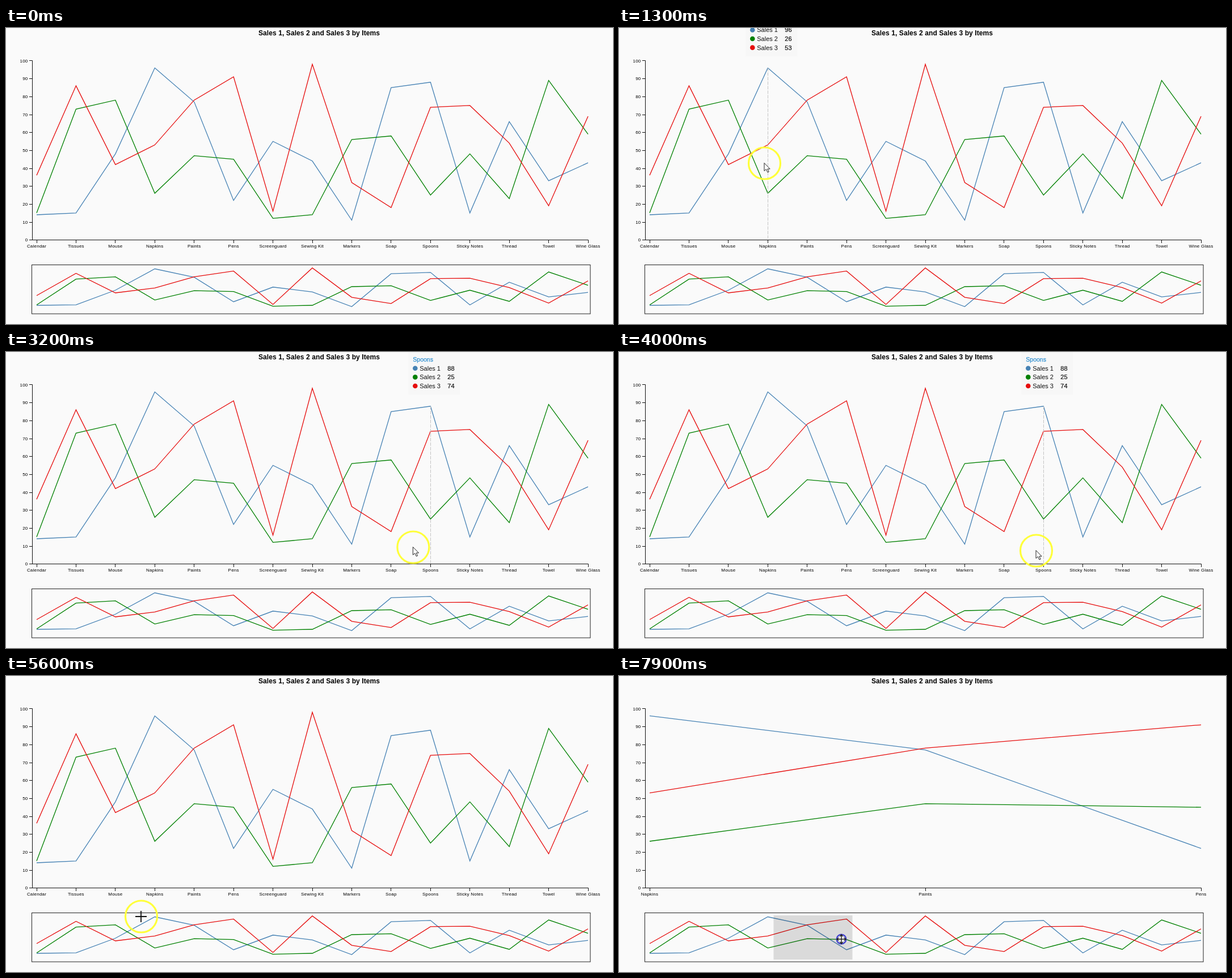
Animation, 1070 px wide and 523 px high, one loop 8000 ms. Source, as an HTML page:

```html
<!DOCTYPE html>
<html lang="en">
<head>
<meta charset="utf-8">
<title>Sales by Items</title>
<style>
  html, body { margin: 0; width: 100%; height: 100%; overflow: hidden; background: #fafafa; }
  svg { display: block; width: 1070px; height: 523px; font-family: "Liberation Sans", Arial, sans-serif; }
  .title { font-size: 12px; font-weight: bold; letter-spacing: .09px; text-anchor: middle; }
  .axis text { font-size: 8px; letter-spacing: .22px; }
  .axis path { fill: none; stroke: #111; }
  .line { fill: none; stroke-width: 1.3; }
  .tip text { font-size: 11px; fill: #111; }
  .tip .head { font-size: 10.5px; fill: #2f8fd0; stroke: #2f8fd0; stroke-width: .25; }
  .tip .num { stroke: #111; stroke-width: .2; }
</style>
</head>
<body>
<svg viewBox="0 0 1070 523">
  <text class="title" x="552" y="13.2">Sales 1, Sales 2 and Sales 3 by Items</text>
  <g id="yAxis" class="axis" text-anchor="end"></g>
  <g id="xAxis" class="axis" text-anchor="middle"></g>
  <g id="main"></g>
  <g id="mini"></g>
  <rect x="45.5" y="418.5" width="984.5" height="86.5" fill="none" stroke="#222"/>
  <rect id="brush" y="423" height="78" fill-opacity=".13"/>
  <path id="guide" fill="none" stroke="#c4c4c4" stroke-dasharray="6 2"/>
  <g id="tip" class="tip"></g>
  <g id="pointer">
    <circle id="halo" cx=".5" r="28" fill="none" stroke="#ffff3a" stroke-width="3.2"/>
    <circle id="press" r="8.3" fill="none" stroke="#4444d0" stroke-width="2.4"/>
    <path id="arrow" d="M0 -.5V13.5L3.4 10.5L6 16L8.2 15L5.8 10H10.2Z" fill="#fff" stroke="#222"/>
    <path id="cross" d="M-10 0H10M0 -10V10" stroke="#111" stroke-width="1.8"/>
    <g id="move" fill="none">
      <path d="M-7 0H7M0 -7V7" stroke="#fff" stroke-width="4.5"/>
      <path d="M-7 0H7M0 -7V7M-5 -2.5L-8 0L-5 2.5M5 -2.5L8 0L5 2.5M-2.5 -5L0 -8L2.5 -5M-2.5 5L0 8L2.5 5"
            stroke="#222" stroke-width="1.5"/>
    </g>
  </g>
</svg>
<script>
const LOOP = 8000, TICK = 100;
const items = ["Calendar", "Tissues", "Mouse", "Napkins", "Paints", "Pens", "Screenguard", "Sewing Kit",
  "Markers", "Soap", "Spoons", "Sticky Notes", "Thread", "Towel", "Wine Glass"];
const series = [
  { name: "Sales 1", color: "steelblue", data: [14, 15, 48, 96, 77, 22, 55, 44, 11, 85, 88, 15, 66, 33, 43] },
  { name: "Sales 2", color: "green", data: [15, 73, 78, 26, 47, 45, 12, 14, 56, 58, 25, 48, 23, 89, 59] },
  { name: "Sales 3", color: "#e60c0c", data: [36, 86, 42, 53, 78, 91, 16, 98, 32, 18, 74, 75, 54, 19, 69] }
];

// Where the hand turns: time, x, y
const turns = [
  [300, 961, 452], [900, 54, 290], [1300, 256, 239], [2000, 690, 330], [2300, 469, 356],
  [2700, 54, 345], [3300, 850, 345], [4000, 735, 351], [4400, 424, 452], [5000, 350, 497],
  [5600, 238, 425], [5700, 238, 425], [6200, 402, 460], [6700, 358, 465],
  [7200, 398, 465], [7600, 398, 465], [7700, 369, 465], [7900, 392, 465]
];
const ENTER = 300, DRAW = 5800, RELEASE = 6600, DRAG = 6700, LAG = 90;
const ANCHOR = 238.5, BRUSH_W = 139, GRIP = 119.5;

const X0 = 54, X1 = 1026, LAST = items.length - 1, STEP = (X1 - X0) / LAST;
const homeX = i => X0 + i * STEP;
const nearest = x => Math.max(0, Math.min(LAST, Math.round((x - X0) / STEP)));
const mainY = v => 374.3 - 3.165 * v;
const miniY = v => 501 - .786 * v;
const trace = (data, x, y) => "M" + data.map((v, i) => x(i).toFixed(2) + " " + y(v).toFixed(2)).join("L");
const $ = id => document.getElementById(id);
const show = (el, on) => { el.style.display = on ? "" : "none"; };

function add(parent, tag, attrs, text = "") {
  const el = document.createElementNS("http://www.w3.org/2000/svg", tag);
  for (const k in attrs) el.setAttribute(k, attrs[k]);
  el.textContent = text;
  return parent.appendChild(el);
}

function pointerAt(t) {
  const n = turns.findIndex(k => k[0] > t);
  if (n < 0) return turns[turns.length - 1].slice(1);
  const a = turns[n - 1], b = turns[n], f = (t - a[0]) / (b[0] - a[0]);
  return [a[1] + (b[1] - a[1]) * f, a[2] + (b[2] - a[2]) * f];
}

// The edge trails the hand while drawing; the whole brush follows it while dragging
function brushAt(t) {
  const left = t < DRAG ? ANCHOR : pointerAt(t)[0] - GRIP;
  const width = t < RELEASE ? Math.min(BRUSH_W, pointerAt(t - LAG)[0] - ANCHOR) : BRUSH_W;
  return { left, width: Math.max(0, width) };
}

// Static parts
let ticks = "M41 57.5H46.5V374.5H41";
for (let v = 0; v <= 100; v += 10) {
  if (v % 100) ticks += `M41 ${Math.round(mainY(v)) + .5}H46.5`;
  add($("yAxis"), "text", { x: 38.5, y: mainY(v) + 2.9 }, v);
}
add($("yAxis"), "path", { d: ticks });
for (const s of series) {
  s.path = add($("main"), "path", { class: "line", stroke: s.color });
  add($("mini"), "path", { class: "line", stroke: s.color, d: trace(s.data, homeX, miniY) });
}
const xLine = add($("xAxis"), "path", {});
const labels = items.map(name => add($("xAxis"), "text", { y: 387.8 }, name));

// Tooltip, placed relative to the highest point
const tip = $("tip");
add(tip, "rect", { x: -39, y: -98, width: 91, height: 78, fill: "#f7f7f7", "fill-opacity": .97 });
const head = add(tip, "text", { class: "head", x: -31, y: -78.4 });
const nums = series.map((s, i) => {
  const y = -67 + i * 15.6;
  add(tip, "circle", { cx: -27, cy: y, r: 4.3, fill: s.color });
  add(tip, "text", { x: -19, y: y + 4 }, s.name);
  return add(tip, "text", { class: "num", x: 30, y: y + 4 });
});

function drawChart(first, last) {
  const count = last - first;
  const x = i => count ? X0 + i * (X1 - X0) / count : (X0 + X1) / 2;
  for (const s of series) s.path.setAttribute("d", trace(s.data.slice(first, last + 1), x, mainY));
  let d = "M46 374.5H1026.5";
  labels.forEach((el, i) => {
    const on = i >= first && i <= last;
    show(el, on);
    if (!on) return;
    const px = x(i - first);
    el.setAttribute("x", px);
    d += `M${Math.floor(px) + .5} 374.5V380`;
  });
  xLine.setAttribute("d", d);
}

function drawTip([px], on) {
  show(tip, on);
  show($("guide"), on);
  if (!on) return;
  const i = nearest(px), x = homeX(i);
  const y = mainY(Math.max(...series.map(s => s.data[i])));
  tip.setAttribute("transform", `translate(${x} ${y})`);
  head.textContent = items[i];
  nums.forEach((el, k) => { el.textContent = series[k].data[i]; });
  $("guide").setAttribute("d", `M${Math.floor(x) + .5} ${y}V374`);
}

function drawPointer(t, [x, y]) {
  const inMini = y > 418 && y < 505, moving = t >= RELEASE;
  const resting = t >= 7300 && t < 7600;
  $("pointer").setAttribute("transform", `translate(${x} ${y})`);
  show($("arrow"), !inMini);
  show($("cross"), inMini && !moving);
  show($("move"), moving);
  show($("press"), t >= DRAW && t < RELEASE || t >= DRAG && !resting);
  show($("halo"), t <= DRAG);
}

function render(t) {
  const entered = t >= ENTER, zoomed = t >= DRAW;
  const pos = pointerAt(Math.max(t, ENTER));
  show($("pointer"), entered);
  show($("brush"), zoomed);
  if (zoomed) {
    const { left, width } = brushAt(t);
    $("brush").setAttribute("x", left);
    $("brush").setAttribute("width", width);
    drawChart(nearest(left), nearest(left + width));
  } else drawChart(0, LAST);
  drawTip(pos, entered && !zoomed && pos[1] < 375);
  drawPointer(t, pos);
}

const start = performance.now();
function loop(now) {
  const t = Math.max(0, now - start) % LOOP;
  render(Math.floor(t / TICK) * TICK);
  requestAnimationFrame(loop);
}
render(0);
requestAnimationFrame(loop);
</script>
</body>
</html>
```
